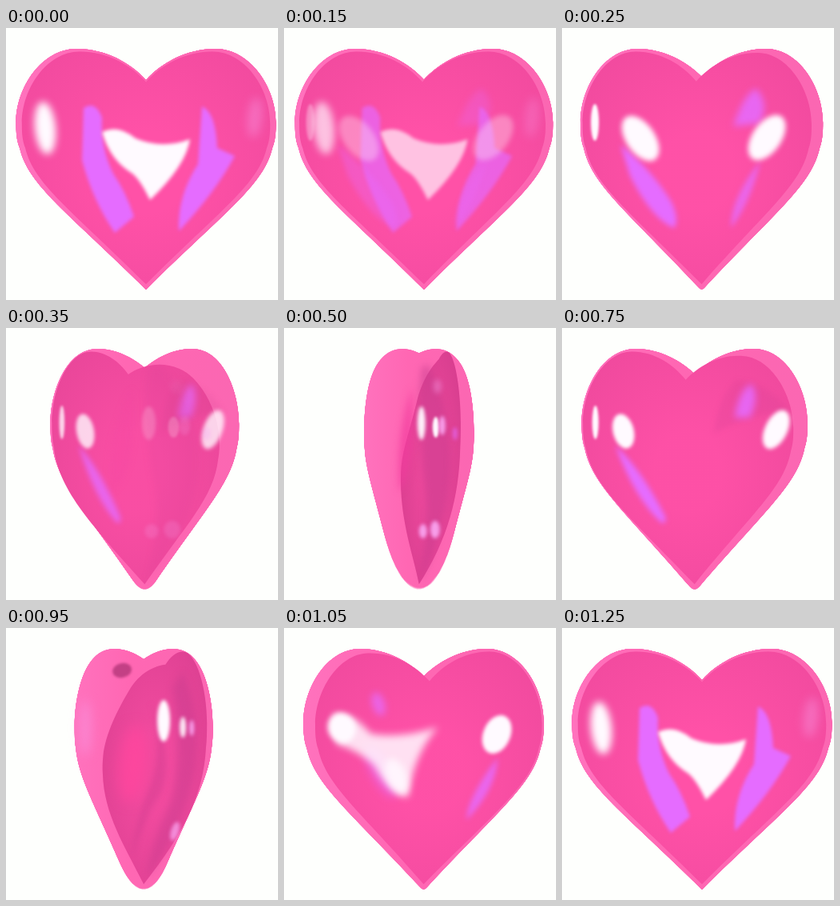
Recreate the animation shown at these times as an HTML page with a canvas. Size 340 by 340 pixels, loop 1.3 s.

```html
<!DOCTYPE html>
<html lang="en">
<head>
<meta charset="utf-8">
<title>Turning heart</title>
<style>
html, body { margin: 0; width: 100%; height: 100%; overflow: hidden; background: #fefffd; }
canvas { display: block; width: 340px; height: 340px; }
</style>
</head>
<body>
<canvas id="stage" width="340" height="340"></canvas>
<script>
const ctx = document.getElementById('stage').getContext('2d');
const LOOP = 1300, STEP = 50, MIDDLE = 150;
const HALF_WIDTH = 162.5, HALF_DEPTH = 58, FACE_DEPTH = 15;
const WHITE = '#fffaff', VIOLET = '#e56cff', LILAC = '#f79de9', SHADE = '#c43a8c';

// Bezier points of half an outline, from beside the notch to above the tip.
const ROUND = [[19, -106], [50, -124], [87, -124], [130, -124], [162.5, -76], [162.5, -32],
  [162.5, -20], [162, -10], [158, 0], [147, 47], [98, 80]];
// The same half seen from the side: nearer and farther lobe.
const NEAR = [[-15, -106], [45, -85], [75, -50], [105, -15], [148, 10], [158, 30],
  [161, 37], [162, 43], [162, 50], [162, 105], [90, 150]];
const FAR = [[62, -122], [75, -124], [87, -124], [130, -124], [162.5, -76], [162.5, -32],
  [162.5, -20], [162, -10], [160, 0], [155, 65], [90, 125]];

const rad = degrees => degrees * Math.PI / 180;
const mix = (a, b, k) => a + (b - a) * k;
const centreX = angle => 170 + 5 * Math.cos(angle);
const halfWidth = angle => Math.hypot(HALF_WIDTH * Math.cos(angle), HALF_DEPTH * Math.sin(angle));

// Slow start, nearly steady turn, soft landing.
function turnAt(t) {
  if (t < 500) return 104 * (t / 500) ** 2.2;
  if (t < 1050) return mix(104, 336, ((t - 500) / 550) ** .97);
  return 360 - 24 * Math.max(0, 1 - (t - 1050) / 200) ** 3.5;
}

// Both sides look alike, so half a turn repeats.
const EDGE = 76;
const facingAt = t => (turnAt(t) + EDGE) % 180 - EDGE;

const oval = (x, y, rx, ry, tilt = 0) => {
  const path = new Path2D();
  path.ellipse(x, y, rx, ry, tilt, 0, 2 * Math.PI);
  return path;
};
const mark = (color, blur, shape, alpha = 1) =>
  ({ color, blur, alpha, path: typeof shape === 'string' ? new Path2D(shape) : shape });

// Reflections seen at a few angles; they blend in between.
const poses = [
  { at: facingAt(500), x: 169, marks: [
    mark(SHADE, 4, 'M180 45Q212 105 207 190Q198 265 170 318Q183 240 174 180Q166 95 172 50Z', .45),
    mark('#f23c9f', 4, 'M160 75Q139 140 145 205Q164 180 160 75Z', .7),
    mark(WHITE, 2, oval(172, 119, 5, 21), .95),
    mark(WHITE, 1.5, oval(190, 124, 4, 13)),
    mark(LILAC, 2, oval(198, 122, 4, 12)),
    mark(VIOLET, 2, oval(214, 132, 3, 8), .6),
    mark(LILAC, 2, oval(174, 254, 5, 9)),
    mark(LILAC, 2, oval(189, 252, 6, 11)),
    mark(LILAC, 3, oval(192, 73, 5, 9), .4)
  ] },
  { at: facingAt(950), x: 172, marks: [
    mark(LILAC, 7, oval(99, 125, 7, 35), .5),
    mark(SHADE, 4, 'M220 55Q244 105 236 175Q222 255 176 312Q182 265 205 220Q222 165 208 75Z', .4),
    mark(SHADE, 3, 'M180 92Q198 145 181 195Q162 235 158 285Q174 235 194 205Q211 160 180 92Z', .3),
    mark('#ff479e', 8, oval(158, 170, 17, 48, .1), .8),
    mark(WHITE, 2, oval(197, 116, 8, 26)),
    mark(WHITE, 2, oval(221, 124, 4, 13), .9),
    mark(LILAC, 2, oval(232, 125, 3, 10)),
    mark(LILAC, 2, oval(211, 254, 5, 12, .3), .8),
    mark('#a92f70', 1.5, oval(145, 53, 12, 9, -.2), .7)
  ] },
  { at: facingAt(1050), x: 174.5, marks: [
    mark(VIOLET, 4, oval(118, 95, 8, 15, -.3), .7),
    mark(VIOLET, 3, 'M267 162Q265 202 228 240Q229 212 267 162Z', .8),
    mark(VIOLET, 6, oval(122, 180, 13, 35, -.5), .5),
    mark(WHITE, 5, 'M62 108Q85 104 108 132Q145 139 192 124Q162 158 155 211Q135 212 112 171Q91 152 66 145Z', .85),
    mark(WHITE, 3, oval(72, 125, 17, 19, -.5)),
    mark(WHITE, 4, oval(141, 185, 12, 23, -.4), .8),
    mark(WHITE, 2, oval(266, 133, 17, 25, .4))
  ] },
  { at: 0, x: 175, marks: [
    mark(VIOLET, 2, 'M97 100Q112 90 120 112Q118 150 134 182Q150 205 160 236L136 256Q108 215 95 165Z'),
    mark(VIOLET, 2, 'M245 98Q262 105 264 150L286 160Q262 205 216 254Q214 210 240 170Z'),
    mark(WHITE, 2, 'M120 130Q140 120 162 138Q195 152 230 139Q225 172 180 215Q168 190 158 182Q130 165 120 130Z'),
    mark(WHITE, 5, oval(49, 125, 13, 33, -.1)),
    mark(LILAC, 6, oval(311, 112, 9, 25, .1), .4)
  ] },
  { at: facingAt(250), x: 174.5, marks: [
    mark(VIOLET, 3, 'M73 146Q112 177 137 218Q147 240 140 250Q112 239 85 185Z'),
    mark(VIOLET, 4, 'M214 123Q228 80 243 76Q260 95 247 119Z', .85),
    mark(VIOLET, 3, 'M248 166Q235 220 211 250Q210 214 248 166Z', .75),
    mark(WHITE, 1.5, oval(41, 118, 5, 23)),
    mark(WHITE, 3, oval(98, 138, 18, 32, -.6)),
    mark(WHITE, 3, oval(256, 137, 18, 32, .6))
  ] },
  { at: facingAt(750), x: 166, marks: [
    mark(SHADE, 3, 'M190 132Q238 105 285 105Q260 70 218 65Q195 90 190 132Z', .15),
    mark(VIOLET, 3, 'M67 147Q99 176 129 235Q132 246 124 243Q91 213 67 147Z'),
    mark(VIOLET, 4, 'M216 112Q222 76 237 70Q248 86 235 112Z', .85),
    mark(WHITE, 1.5, oval(42, 118, 4, 21)),
    mark(WHITE, 2, oval(77, 129, 13, 22, -.25)),
    mark(WHITE, 2.5, oval(268, 127, 14, 26, .45))
  ] }
];

// lean (-1 or 1) is the nearer lobe; side goes from 0, front view, to 1, edge view.
function heart(x, sx, sy, lean = 0, side = 0, tipX = x) {
  const path = new Path2D();
  const place = (u, v) => [x + u * sx, MIDDLE + v * sy ** (v > 0 ? 1.1 : .8)];
  const notch = place(-50 * lean * side, mix(-85, -118, side));
  const tip = [tipX, place(0, 177)[1]];
  for (const hand of [-1, 1]) {
    const turned = hand === lean ? NEAR : FAR;
    const points = ROUND.map(([u, v], i) =>
      place(hand * mix(u, turned[i][0], side), mix(v, turned[i][1], side)));
    points.push(tip);
    path.moveTo(...notch);
    for (let i = 0; i < points.length; i += 3)
      path.bezierCurveTo(...points[i], ...points[i + 1], ...points[i + 2]);
    path.lineTo(...notch);
  }
  return path;
}

function drawBody(x, angle) {
  const c = Math.cos(angle), s = Math.sin(angle);
  const width = halfWidth(angle);
  const rim = ctx.createLinearGradient(x - width, 0, x + width, 0);
  rim.addColorStop(0, '#ff72bd');
  rim.addColorStop(.4, '#ff67b3');
  rim.addColorStop(1, '#fb67b2');
  ctx.fillStyle = rim;
  for (let a = -89; a < 90; a++) {
    const scale = Math.cos(rad(a));
    ctx.fill(heart(x + HALF_DEPTH * Math.sin(rad(a)) * s, c * scale, scale), 'nonzero');
  }
}

function drawFace(x, angle) {
  const c = Math.cos(angle), s = Math.sin(angle);
  const side = s ** 4;
  const faceX = x - FACE_DEPTH * s;
  const face = heart(faceX, c * .955, .965, Math.sign(s), side, x);
  ctx.fillStyle = '#ff51a7';
  ctx.fill(face);
  ctx.save();
  ctx.clip(face);
  ctx.translate(faceX, 180);
  ctx.scale(Math.max(c, .05), 1);
  const shade = ctx.createRadialGradient(0, 0, 50, 0, 0, 185);
  shade.addColorStop(0, `rgba(170,40,115,${.25 * side})`);
  shade.addColorStop(1, `rgba(170,40,115,${.15 + .35 * side})`);
  ctx.fillStyle = shade;
  ctx.fillRect(-800, -180, 1600, 340);
  ctx.restore();
}

function drawMarks(pose, x, angle, weight) {
  if (weight < .01) return;
  const stretch = halfWidth(angle) / halfWidth(rad(pose.at));
  ctx.save();
  ctx.translate(x, 0);
  ctx.scale(stretch, 1);
  ctx.translate(-pose.x, 0);
  for (const m of pose.marks) {
    ctx.globalAlpha = m.alpha * weight;
    ctx.filter = `blur(${m.blur}px)`;
    ctx.fillStyle = m.color;
    ctx.fill(m.path);
  }
  ctx.restore();
}

function draw(t) {
  const x = centreX(rad(turnAt(t)));
  const facing = facingAt(t);
  const angle = rad(facing > 90 ? facing - 180 : facing);
  ctx.fillStyle = '#fefffd';
  ctx.fillRect(0, 0, 340, 340);
  drawBody(x, angle);
  drawFace(x, angle);

  let i = poses.length - 1;
  while (i > 0 && poses[i].at > facing) i--;
  const from = poses[i], to = poses[(i + 1) % poses.length];
  const end = to.at > from.at ? to.at : to.at + 180;
  const k = (facing - from.at) / (end - from.at);
  drawMarks(from, x, angle, 1 - k);
  drawMarks(to, x, angle, k);
}

function tick() {
  draw(Math.floor(performance.now() % LOOP / STEP) * STEP);
  requestAnimationFrame(tick);
}
tick();
</script>
</body>
</html>
```
